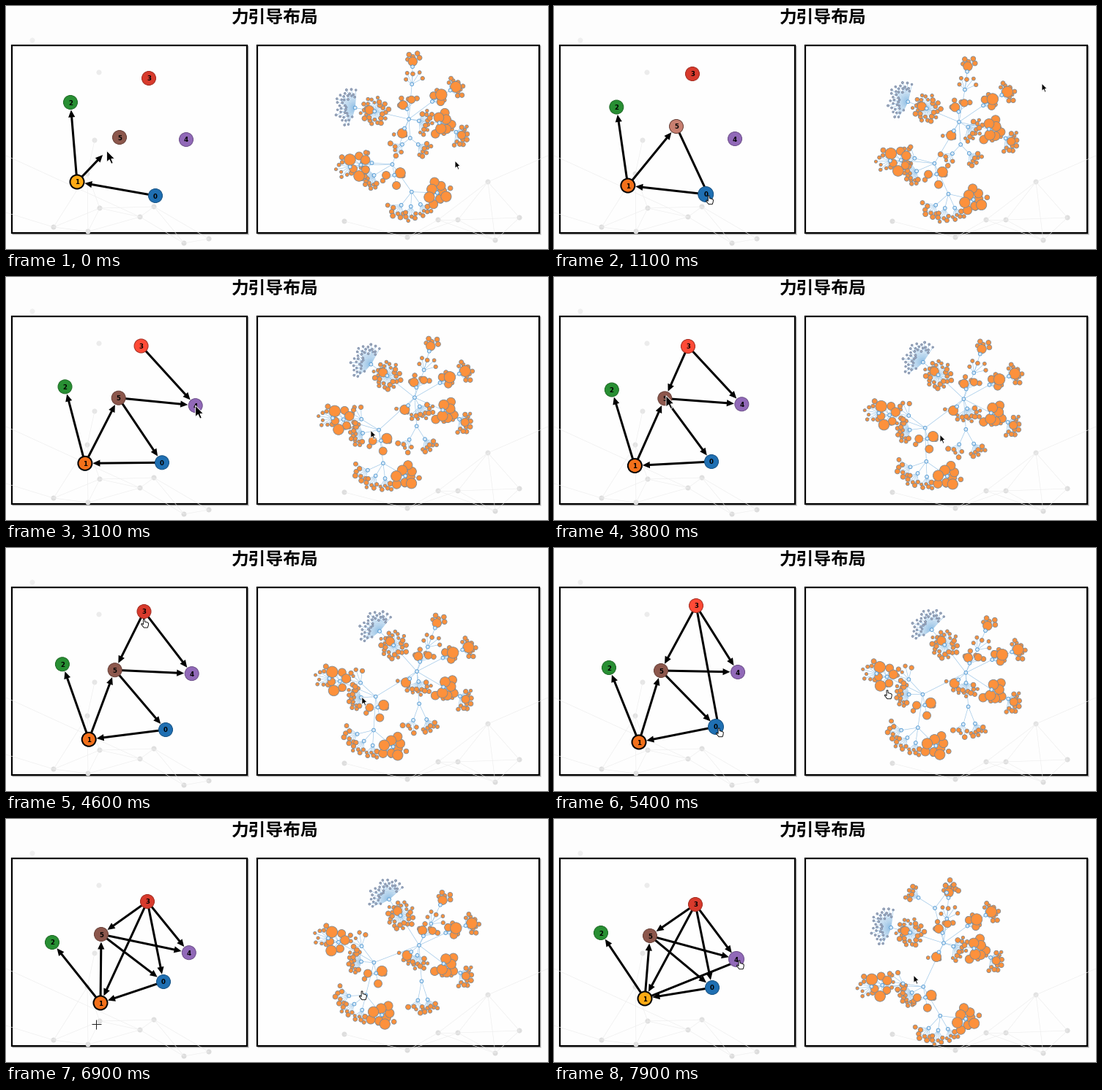
Recreate the animation shown at these times as a matplotlib script. Size 740 px wide and 333 px high, loop 8000 ms.

```python
import numpy as np
import matplotlib.pyplot as plt
from matplotlib.animation import FuncAnimation
from matplotlib.collections import LineCollection, PolyCollection
from matplotlib.colors import to_rgb
from matplotlib.patches import Circle, Polygon, Rectangle

W, H = 740, 333
PX = 0.72  # points per pixel at 100 dpi
FRAMES, STEP = 80, 100
SETTLED, RESTART, END = 6.9, 7.4, 7.9

fig = plt.figure(figsize=(W / 100, H / 100), dpi=100, facecolor="#fdfdfd")
ax = fig.add_axes([0, 0, 1, 1])
ax.set_xlim(0, W)
ax.set_ylim(H, 0)
ax.axis("off")


# ---------- backdrop ----------
def panel(x0, y0, x1, y1):
    for k, a in ((2, .12), (1.2, .25)):
        ax.add_patch(Rectangle((x0 + k, y0 + k), x1 - x0, y1 - y0, fc="none",
                               ec="black", alpha=a, lw=2 * PX, zorder=0))
    ax.add_patch(Rectangle((x0, y0), x1 - x0, y1 - y0, fc="#fefefe",
                           ec="black", lw=2.2 * PX, zorder=1))


panel(8, 54, 329, 311)
panel(343, 54, 728, 311)

dots = np.array([(65, 303), (112, 309), (183, 289), (202, 275), (128, 277), (111, 230),
                 (121, 184), (127, 91), (36, 47), (243, 325), (277, 319), (590, 293),
                 (617, 293), (668, 321), (548, 317), (462, 295), (701, 290), (658, 241)])
for x, y in dots:
    ax.add_patch(Circle((x, y), 3.5, fc=str(.95 - .09 * y / H), ec="none", zorder=2))
web = [(a, b) for i, a in enumerate(dots) for b in dots[:i] if np.hypot(*(a - b)) < 90]
web += [[(0, 205), (183, 289)], [(0, 283), (65, 303)], [(658, 241), (740, 205)]]
ax.add_collection(LineCollection(web, colors=".93", linewidths=.6 * PX, zorder=2))

ax.text(367.5, 13, "力引导布局", family="Noto Sans CJK JP", weight="bold",
        size=23.8 * PX, ha="center", va="center_baseline", zorder=3)


# ---------- left graph ----------
RAD = 9.5
# turning points (time, x, y) of each node
paths = [
    [(0, 204, 260), (3.8, 215, 253), (5.4, 221, 245), (6.9, 215, 223), (7.9, 216, 231)],
    [(0, 97, 241), (5.4, 116, 266), (6.9, 129, 252), (7.9, 124, 246)],
    [(0, 88, 132), (5.4, 75, 164), (6.9, 63, 169), (7.9, 64, 156)],
    [(0, 195, 99), (1.1, 189, 93), (3.8, 183, 95), (5.4, 194, 79), (6.9, 193, 113),
     (7.9, 193, 117)],
    [(0, 246, 183), (1.1, 247, 182), (2.4, 261, 178), (5.4, 251, 170), (7.9, 249, 192)],
    [(0, 155, 180), (1.1, 167, 165), (2.4, 156, 165), (5.4, 146, 168), (6.9, 130, 158),
     (7.9, 131, 160)],
]
fills = ["#1f6fb2", "#f3701a", "#288f33", "#d83a2c", "#9169b8", "#8c574c"]
bright = {1: "#ffaa14", 3: "#ff4a36", 5: "#c87f70"}

# (source, target, press, release)
drags = [(1, 5, -.7, .4), (5, 0, .7, 1.2), (5, 4, 1.5, 2.1), (3, 4, 2.4, 3.1),
         (3, 5, 3.35, 3.75), (3, 0, 4.7, 5.5), (3, 1, 5.9, 6.5), (1, 4, 7.3, 8)]
fixed = [(0, 1), (1, 2)]

edges = LineCollection([], colors="black", linewidths=3 * PX, zorder=4)
heads = PolyCollection([], facecolors="black", edgecolors="none", zorder=4)
ax.add_collection(edges)
ax.add_collection(heads)
discs, tags = [], []
for i, fill in enumerate(fills):
    rim = "black" if i == 1 else np.array(to_rgb(fill)) * .75
    discs.append(ax.add_patch(Circle((0, 0), RAD, fc=fill, ec=rim, zorder=5,
                                     lw=(2 if i == 1 else 1) * PX)))
    tags.append(ax.text(0, 0, str(i), size=8.6 * PX, weight="bold", ha="center",
                        va="center_baseline", family="DejaVu Sans", zorder=6))


def along(t, keys):
    """Point at time t on a path of (time, x, y) keys."""
    ts, xs, ys = zip(*keys)
    return np.array([np.interp(t, ts, xs), np.interp(t, ts, ys)])


def arrow(a, b, gap):
    """Shaft and head of an arrow whose tip stops gap pixels before b."""
    u = (b - a) / np.hypot(*(b - a))
    n = np.array([-u[1], u[0]])
    tip = b - gap * u
    return [a, tip - 8 * u], [tip, tip - 10 * u + 4.6 * n, tip - 10 * u - 4.6 * n]


# ---------- cursors ----------
ARROW = np.array([(0, 0), (0, 15.5), (3.6, 12.3), (6.2, 18), (8.6, 17),
                  (6.2, 11.3), (10.8, 11)])
HAND = np.array([(-1, 0), (1, 0), (1.3, 4), (5.5, 5), (7, 6.5), (6.6, 10),
                 (5.5, 13), (0, 13), (-4, 8), (-3.3, 6.6), (-1, 8.3)])
CROSS = np.array([[(-6.5, 0), (6.5, 0)], [(0, -6.5), (0, 6.5)]])


class Cursor:
    def __init__(self, size):
        self.size = size
        self.shape = ax.add_patch(Polygon(ARROW, closed=True, lw=.9 * PX, zorder=9))
        self.cross = LineCollection([], colors="#222", linewidths=PX, zorder=9)
        ax.add_collection(self.cross)

    def show(self, kind, p):
        self.shape.set_visible(kind != "cross")
        self.cross.set_segments(CROSS + p if kind == "cross" else [])
        if kind == "hand":
            self.shape.set(xy=HAND * .9 + p, fc="white", ec="black")
        else:
            self.shape.set(xy=ARROW * self.size + p, fc="black", ec="white")


left_cur, right_cur = Cursor(1), Cursor(.68)
GRIP = np.array([4, 2])


def draw_left(t):
    pos = np.array([along(t, p) for p in paths])

    way = [(6.9, 123, 281)]
    for s, d, t0, t1 in drags:
        way += [(t0, *pos[s]), (t1 - .1, *pos[d]), (t1, *pos[d])]
    p = along(t, sorted(way))
    live = next((g for g in drags if g[2] <= t < g[3]), None)
    over = live is not None and t > live[3] - .101
    near = np.hypot(*(pos - p).T).min() < 11
    released = any(0 <= t - g[3] < .12 for g in drags)
    kind = "hand" if near and not released else "arrow" if live or released else "cross"

    parts = [arrow(pos[a], pos[b], 10.5)
             for a, b in fixed + [g[:2] for g in drags if t >= g[3]]]
    if live and np.hypot(*(p - pos[live[0]])) > 20:
        parts.append(arrow(pos[live[0]], p + GRIP if over else p, 0 if over else 8))
    edges.set_segments([s for s, _ in parts])
    heads.set_verts([h for _, h in parts])

    lit = {g[0] for g in drags if g[2] < t <= g[3] + .3}
    for i, (disc, tag) in enumerate(zip(discs, tags)):
        disc.center = pos[i]
        disc.set_facecolor(bright[i] if i in lit else fills[i])
        disc.set_radius(RAD * (1.1 if over and live[1] == i else 1))
        tag.set_position(pos[i])
    left_cur.show(kind, p + GRIP * (kind == "hand"))


# ---------- right graph ----------
rng = np.random.default_rng(7)
hubs, leaves = {}, []
ORANGE, TINY, HUB = 0, 1, 2


def scatter_leaves(name, n, kind, radius, reach, spread):
    """Fan n leaves around the outward direction of a hub."""
    for j in range(n):
        ang = np.radians(spread * ((2 * j + 1) / n - 1))
        frac = (j * .618 + rng.uniform(0, .2)) % 1
        dist = reach[0] + (reach[1] - reach[0]) * frac
        leaves.append((list(hubs).index(name), ang, dist, rng.uniform(*radius), kind))


def hub(name, parent, length, angle, turn=None, grow=0, fresh=None,
        small=0, big=0, tiny=0, spread=70):
    """Tree joint on a link that swings by turn degrees and stretches by grow.

    fresh is an extra swing of the tangled layout just after a restart.
    Swings pass on to the children.
    """
    up = hubs.get(parent, (None, 0, 0, 0, 0, 0))
    hubs[name] = (parent, length, angle, up[3] if turn is None else turn, grow,
                  up[5] if fresh is None else fresh)
    scatter_leaves(name, tiny, TINY, (1.2, 1.5), (12, 28), spread)
    scatter_leaves(name, small, ORANGE, (2, 3.5), (10, 20), spread)
    scatter_leaves(name, big, ORANGE, (5, 7.8), (7, 18), spread)


hub("root", None, 0, 0)
hub("ring", "root", 48, 193, turn=45, small=26, big=1, spread=180)
hub("puff", "ring", 27, 190, tiny=36, spread=85)
hub("stem", "root", 48, -85, turn=24, grow=-.3, small=5)
hub("tip", "stem", 24, -88, grow=.2, small=5, big=1, spread=45)
hub("crown", "root", 14, -100, turn=35, small=4, big=2)
hub("east", "root", 14, 10, turn=90, small=13, spread=80)
hub("west", "root", 14, 115, turn=25, small=2, big=1)
hub("fork", "root", 40, -37, turn=12, small=6, big=3, spread=60)
hub("fan", "fork", 29, -32, small=11, big=1, spread=75)
hub("mass", "root", 42, 7, turn=30, small=6, big=7, spread=120)
hub("side", "mass", 26, 29, turn=0, small=12, big=1, spread=75)
hub("leg", "root", 26, 86, turn=0, grow=.9, fresh=170)
hub("foot1", "leg", 14, 141, turn=-40, grow=.9, small=5, spread=55)
hub("foot2", "leg", 14, 39, turn=33, grow=.9, small=8, spread=50)
hub("south", "root", 66, 110, turn=49)
hub("clump", "south", 43, 179, turn=31, grow=.3, small=4, big=6, spread=160)
hub("spray", "clump", 15, 170, small=7)
hub("brush", "south", 29, 149, turn=35, grow=-.4, small=16, spread=80)
hub("twig", "south", 28, 184, small=5)
hub("trio", "south", 15, 79, turn=0, small=2, big=3, spread=150)
hub("base", "south", 46, 55)
hub("toe1", "base", 23, 128, small=7, spread=60)
hub("toe2", "base", 20, 93, small=6, spread=45)
hub("toe3", "base", 21, 55, small=6, spread=45)
hub("heap", "base", 35, 2, small=8, big=8, spread=170)

names = list(hubs)
parents = np.array([names.index(h[0] or "root") for h in hubs.values()])
leaves.sort(key=lambda q: q[3])
owner, ang, dist, rad, kind = (np.array(c) for c in zip(*leaves))

links = LineCollection([], colors="#9cc6e8", linewidths=.65 * PX, zorder=3)
ax.add_collection(links)
radii = np.r_[rad, np.full(len(names), 2.4)]
kinds = np.r_[kind, np.full(len(names), HUB)]
spots = ax.scatter(0 * radii, 0 * radii, s=(2 * radii * PX) ** 2, zorder=4,
                   c=np.array(["#fd913c", "#a9aeb8", "#d8e9f8"])[kinds],
                   edgecolors=np.array(["#7a8792", "#7489ab", "#4a95d0"])[kinds],
                   linewidths=.8 * PX)


def tree_at(t):
    """Hub places and outward angles."""
    fresh = t >= RESTART
    if fresh:
        p, stretch, root = .1, 1, (532, 170)
        scale = 1 - .15 * ((END - t) / (END - RESTART)) ** 2
    else:
        p = 1 - (1 - min(t / SETTLED, 1)) ** 1.4
        stretch, scale, root = p, 1, (550 + 14 * p, 155 + 18 * p)
    at, out = [], []
    for k, (_, length, angle, turn, grow, tangle) in enumerate(hubs.values()):
        a = np.radians(angle + turn * p + tangle * fresh)
        start = at[parents[k]] if k else np.array(root)
        at.append(start + scale * length * (1 + grow * stretch)
                  * np.array([np.cos(a), np.sin(a)]))
        out.append(a)
    return np.array(at), np.array(out)


tour = [(0, 613, 212), (1.1, 666, 106), (2.3, 473, 205), (2.5, 473, 205),
        (3.8, 527, 216), (5.2, 455, 195), (5.6, 455, 195), (6.7, 486, 236),
        (7.2, 486, 236), (7.4, 640, 180), (7.9, 491, 214)]


def draw_right(t):
    c, out = tree_at(t)
    a = out[owner] + ang
    tips = c[owner] + dist[:, None] * np.c_[np.cos(a), np.sin(a)]
    links.set_segments(list(zip(c, c[parents])) + list(zip(tips, c[owner])))
    spots.set_offsets(np.vstack([tips, c]))
    p = along(t, tour)
    resting = np.allclose(p, along(t + .05, tour)) or np.allclose(p, along(t - .05, tour))
    right_cur.show("hand" if resting and 0 < t < RESTART else "arrow", p)


def update(i):
    t = i * STEP / 1000
    draw_left(t)
    draw_right(t)
    return []


anim = FuncAnimation(fig, update, frames=FRAMES, interval=STEP, repeat=True,
                     repeat_delay=0, blit=False)
plt.show()
```
